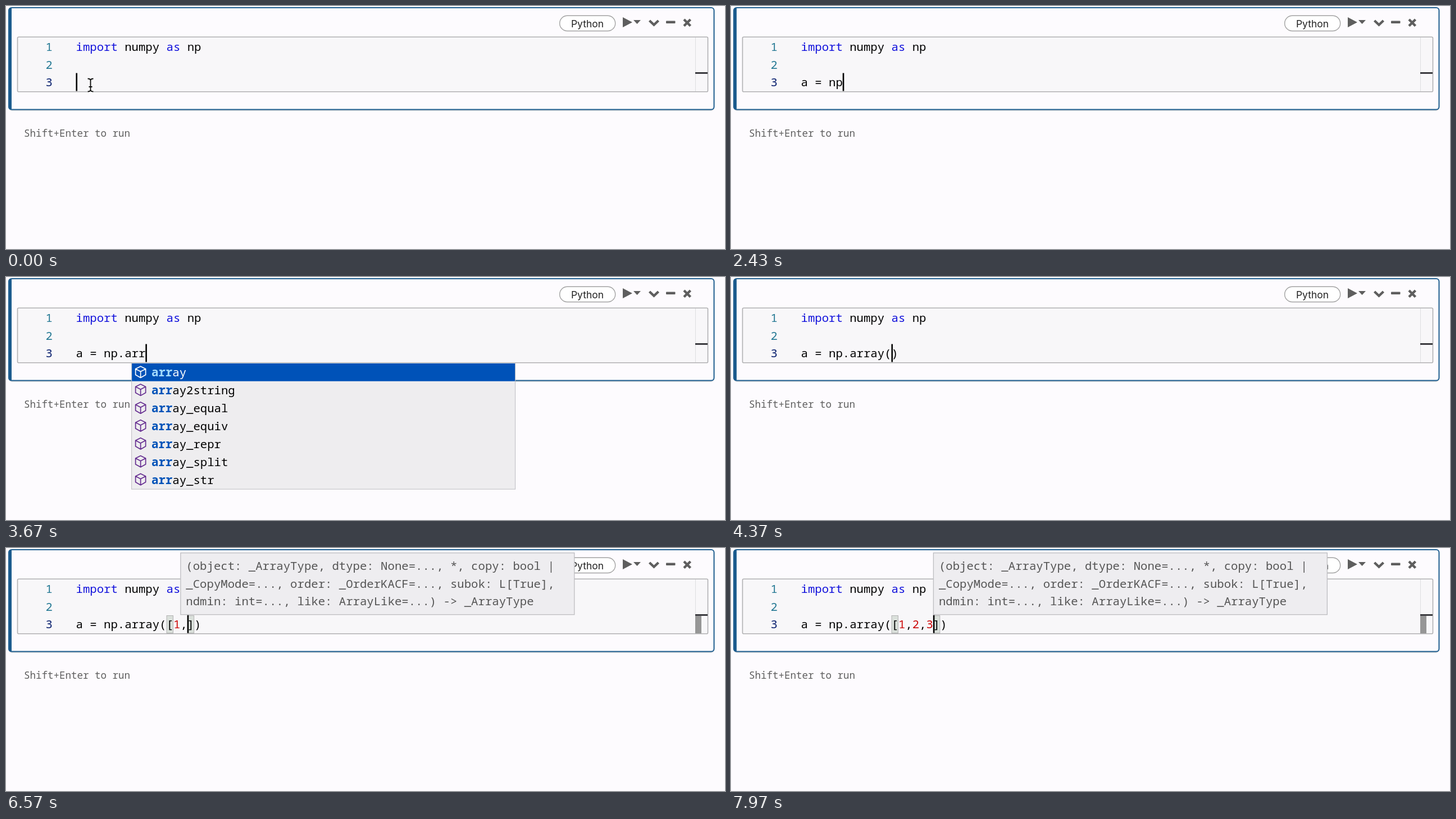
Animation, 1280 px wide and 433 px high, one loop 8000 ms. Source, as an HTML page:

```html
<!DOCTYPE html>
<html lang="en">
<head>
<meta charset="utf-8">
<title>Notebook cell</title>
<style>
  html, body { margin: 0; width: 100%; height: 100%; overflow: hidden; background: #fdfbfe; }
  svg { display: block; width: 100%; height: 100%; }
  text { white-space: pre; font: 20.65px "Noto Sans Mono", monospace; }
  .kw { fill: #1212dc; }
  .num { fill: #cc0808; }
  .line { fill: #237893; text-anchor: end; }
  .tip text { fill: #555; }
  .hit { font-weight: 700; fill: #0052b8; }
  .on { fill: #fff; }
  .on .hit { fill: #a5dcff; }
  .cube { fill: none; stroke: #652d90; stroke-width: 1.7; stroke-linejoin: round; }
  .on .cube { stroke: #fff; }
  .match { fill: rgba(0, 60, 0, .12); stroke: #b2b2b2; }
</style>
</head>
<body>
<svg viewBox="0 0 1280 433" preserveAspectRatio="none">
  <defs>
    <path id="cube" d="M0-10.3L9-5.8V4.8L0 10L-9 4.8V-5.8ZM-9-5.8L0-1L9-5.8M0-1V10"/>
    <path id="beam" d="M-5-11.5Q0-11.5 0-8Q0-11.5 5-11.5M0-8V8M-5 11.5Q0 11.5 0 8Q0 11.5 5 11.5M-3 3H3"/>
  </defs>
  <rect width="1280" height="433" fill="#fdfbfe"/>

  <!-- cell -->
  <rect x="5" y="5" width="1256" height="182" rx="6" fill="#000" opacity=".13"/>
  <rect x="5" y="3" width="1255.5" height="181.5" rx="5" fill="#fdfbfe" stroke="#1c5c8e" stroke-width="2"/>
  <path d="M10 3H9Q4.5 3 4.5 8V180Q4.5 184.500 9 184.500H10Z" fill="#1c5c8e"/>
  <rect x="20.500" y="55.300" width="1229" height="97.500" rx="2" fill="#f8f7f9" stroke="#b0b0b2" stroke-width="1.600"/>

  <!-- toolbar -->
  <rect x="985.700" y="17.200" width="99" height="27.300" rx="13.600" fill="#fff" stroke="#a2a2a2" stroke-width="1.400"/>
  <text x="1035" y="37.600" text-anchor="middle" fill="#222" style="font:17.500px Inter,sans-serif">Python</text>
  <g fill="#5e5e5e">
    <path d="M1098 20L1115 29L1098 38Z"/>
    <path d="M1117 25H1130L1123.500 32Z"/>
    <rect x="1175" y="26.500" width="16.500" height="4.500" rx="1"/>
  </g>
  <g fill="none" stroke="#5e5e5e" stroke-width="4.400">
    <path d="M1145.500 26L1153.500 33.500L1161.500 26"/>
    <path d="M1207 24L1218.500 35.500M1218.500 24L1207 35.500"/>
  </g>

  <!-- overview ruler -->
  <path d="M1227.500 56V152" stroke="#dedee0"/>
  <rect id="mark" x="1227" y="121" width="11" height="31" fill="#969696"/>
  <rect x="1227" y="118" width="22" height="2.800" fill="#2f2f33"/>

  <!-- code -->
  <text class="line" x="83" y="79.800">1</text>
  <text class="line" x="83" y="111.600">2</text>
  <text class="line" x="83" y="143.400" style="fill:#0b216f">3</text>
  <text x="124.500" y="79.800"><tspan class="kw">import</tspan> numpy <tspan class="kw">as</tspan> np</text>
  <g id="brackets">
    <rect class="match" y="120.500" width="11.400" height="31"/>
    <rect class="match" y="120.500" width="11.400" height="31"/>
  </g>
  <text id="code" x="124.500" y="143.400"></text>
  <rect id="caret" y="119.500" width="2.600" height="32" fill="#000"/>
  <g id="pointer" transform="translate(150.500 141)" fill="none">
    <use href="#beam" stroke="#fff" stroke-width="4"/>
    <use href="#beam" stroke="#111" stroke-width="1.900"/>
  </g>

  <text x="32" y="232.800" fill="#5f5f5f" style="font-size:17.500px">Shift+Enter to run</text>

  <g id="popup"></g>
  <g id="tip" class="tip">
    <rect x=".5" y="8.700" width="701" height="110" fill="#eeedf0" stroke="#bdbdc1" stroke-width="1.300"/>
    <text x="10" y="38.600">(object: _ArrayType, dtype: None=..., *, copy: bool |</text>
    <text x="10" y="70.500">_CopyMode=..., order: _OrderKACF=..., subok: L[True],</text>
    <text x="10" y="102.400">ndmin: int=..., like: ArrayLike=...) -&gt; _ArrayType</text>
  </g>
</svg>
<script>
  const LOOP = 8000, LEFT = 124.5, CHAR = 12.39, ROW = 31.87;
  const $ = id => document.getElementById(id);
  const colX = col => LEFT + col * CHAR;
  const show = (el, on) => el.setAttribute("display", on ? "inline" : "none");

  // time and line content, with | at the caret
  const typing = [
    [0, "|"], [870, "a|"], [1130, "a |"], [1230, "a =|"], [1330, "a = |"],
    [1740, "a = n|"], [1900, "a = np|"], [2800, "a = np.|"], [3050, "a = np.a|"],
    [3500, "a = np.ar|"], [3640, "a = np.arr|"], [3760, "a = np.arra|"],
    [3880, "a = np.array|"], [4370, "a = np.array(|)"], [5050, "a = np.array([|])"],
    [5870, "a = np.array([1|])"], [6500, "a = np.array([1,|])"],
    [7070, "a = np.array([1,2|])"], [7400, "a = np.array([1,2,|])"],
    [7720, "a = np.array([1,2,3|])"]
  ];

  // start, column, typed prefix, entries, scroll thumb
  const arrays = "array array2string array_equal array_equiv array_repr array_split array_str";
  const popups = [
    [0], [950, 1, 1, "abs all and any as ascii assert await"], [1130],
    [3080, 8, 1, "abs absolute add add_docstring add_newdoc add_newdoc_ufunc all allclose alltrue", 78],
    [3520, 8, 2, "arange arccos arccosh arcsin arcsinh arctan arctan2 arctanh argmax", 160],
    [3660, 8, 3, arrays], [3780, 8, 4, arrays], [3900, 8, 5, arrays], [4040]
  ];

  const TIP_START = 4830, TIP_LAG = 130, MATCH_START = 4430;
  const latest = (list, t) => list.findLast(item => item[0] <= t) || list[0];

  function popupMarkup([, col, typed, words, thumb]) {
    if (!words) return "";
    const list = words.split(" ");
    const height = list.length * ROW + 2;
    const rows = list.map((word, i) => `
      <g class="${i ? "" : "on"}" transform="translate(0 ${17 + i * ROW})">
        ${i ? "" : '<rect x="1" y="-15.500" width="682" height="31.700" fill="#0052b8"/>'}
        <use href="#cube" class="cube" x="16.500"/>
        <text x="36" y="7.800"><tspan class="hit">${word.slice(0, typed)}</tspan>${word.slice(typed)}</text>
      </g>`).join("");
    const bar = thumb ? `<rect x="666" y="1.500" width="16" height="${thumb}" fill="#646464" opacity=".5"/>` : "";
    return `<g transform="translate(${colX(col) - .5} 152.500)">
      <rect x=".5" y=".5" width="683" height="${height}" fill="#eeedef" stroke="#bdbdc1"/>${rows}${bar}</g>`;
  }

  let drawnLine, drawnPopup;

  function render(t) {
    const line = latest(typing, t)[1];
    const col = line.indexOf("|");
    const code = line.replace("|", "");

    if (line !== drawnLine) {
      drawnLine = line;
      $("code").innerHTML = code.replace(/\d/g, '<tspan class="num">$&</tspan>');
      $("caret").setAttribute("x", colX(col) - .1);
      const open = code.includes("[") ? code.indexOf("[") : code.indexOf("(");
      const [left, right] = $("brackets").children;
      left.setAttribute("x", colX(open) + .5);
      right.setAttribute("x", colX(col) + .5);
    }

    const popup = latest(popups, t);
    if (popup !== drawnPopup) {
      drawnPopup = popup;
      $("popup").innerHTML = popupMarkup(popup);
    }

    show($("pointer"), t < typing[1][0]);
    show($("brackets"), t >= MATCH_START);
    show($("mark"), t >= MATCH_START);
    show($("tip"), t >= TIP_START);
    const tipCol = latest(typing, t - TIP_LAG)[1].indexOf("|");
    $("tip").setAttribute("transform", `translate(${colX(tipCol)} 0)`);
  }

  const start = performance.now();
  function tick() {
    render((performance.now() - start) % LOOP);
    requestAnimationFrame(tick);
  }
  tick();
</script>
</body>
</html>
```
